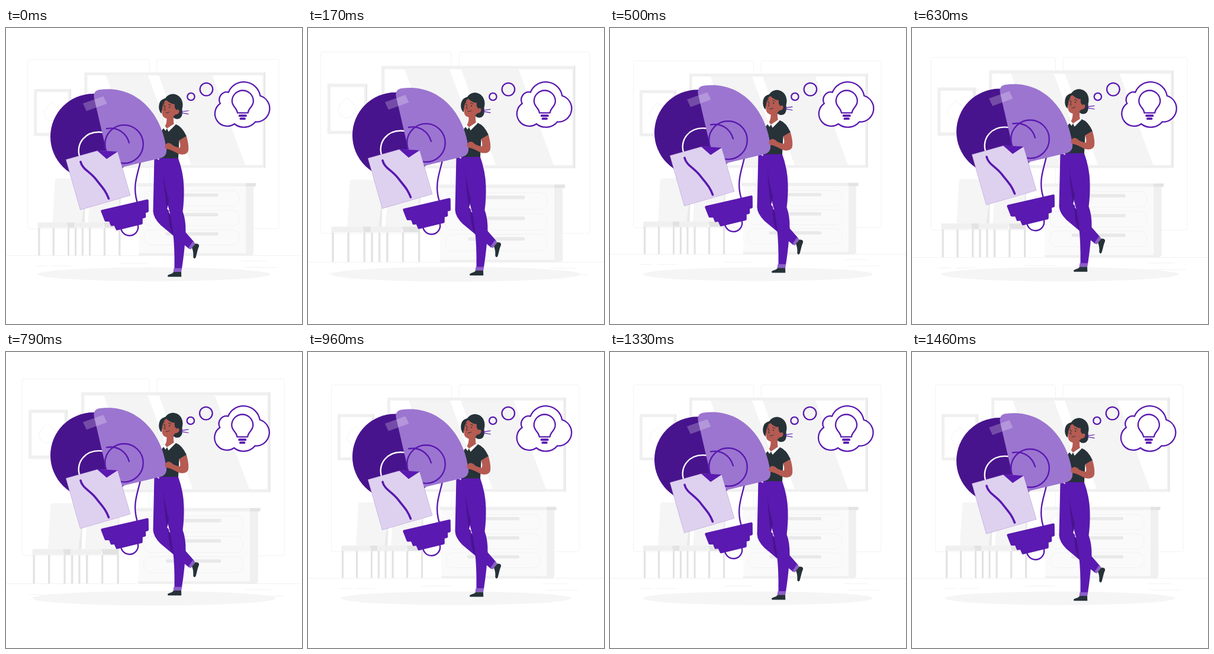
An HTML page for the animation above (1500 ms loop, 500 px wide and 500 px high).

```html
<!DOCTYPE html>
<html lang="en">
<head>
<meta charset="utf-8">
<title>Building an idea</title>
<style>
  html, body { margin: 0; height: 100%; overflow: hidden; background: #fff; }
  svg { display: block; width: 100vw; height: 100vh; }
  .line { fill: none; stroke: #5a19b0; stroke-width: 2.4; stroke-linecap: round; }
  .main { fill: #5a19b0; }
  .deep { fill: #48148d; }
  .soft { fill: #9c75d0; }
  .cuff { fill: #8c5ec8; }
  .ink { fill: #263238; }
  .skin { fill: #b55b52; }
  .face { fill: none; stroke: #263238; stroke-width: .9; stroke-linecap: round; }
  .faint { fill: none; stroke: #f0f0f0; stroke-width: .8; }
</style>
</head>
<body>
<svg viewBox="0 0 500 500">
  <g id="room">
    <g class="faint">
      <rect x="39.5" y="55.5" width="203" height="282" rx="3"/>
      <rect x="255" y="55.5" width="203" height="282" rx="3"/>
      <path d="M-50 382.3H550M52 399.500H73M80 399.500H112M192 395.500H241M396 391.500H437M402 402H456"/>
    </g>

    <!-- pictures -->
    <path fill="#e6e6e6" d="M52 105H112V183H52ZM136 77H435.500V236H136Z"/>
    <path fill="#f0f0f0" d="M50 105H110.500V183H50ZM134 77H433.500V236H134Z"/>
    <path fill="#fff" d="M55 110H107V178H55ZM139 82H431V231.500H139Z"/>
    <path class="faint" d="M80.500 126L92 138Q97 147 90 154Q80 162 71 154Q64 147 69 138Z"/>
    <path fill="#f4f4f4" d="M170 82H240L294 231.500H224ZM258 82H347L402 231.500H312Z"/>

    <!-- dresser -->
    <path fill="#fafafa" d="M225 266H404V379H225Z"/>
    <path fill="#f0f0f0" d="M222 261.500H404V267H222ZM403 267H416V379L413 382.500H226L224 378.500H403Z"/>
    <path fill="#e3e3e3" d="M403 261.500H419.500V267H403Z"/>
    <g id="drawers"></g>

    <!-- chairs -->
    <path fill="#f5f5f5" d="M89 254H134Q138 254 137 258L130 327H81L85 258Q85 254 89 254ZM149 254H192Q196 254 195 258L190 327H140L145 258Z"/>
    <path fill="#e9e9e9" d="M137 256L134.500 327H129.500L134 290ZM195 256L194 327H190L192 290Z"/>
    <path fill="#e3e3e3" d="M57 336h3.200v46h-3.200zM81 336h3.200v46h-3.200zM106 336h3v46h-3zM117.800 336h3.200v46h-3.200zM129.500 336h3v46h-3zM141.500 336h3.200v46h-3.200zM166 336h3.200v46h-3.200zM191 336h3.200v46h-3.200z"/>
    <path fill="#f0f0f0" d="M56 329Q56 327 58 327H166V336H56Z"/>
    <path fill="#e3e3e3" d="M105 327H117V336H107ZM166 327H192Q194 327 194 329V336H168Z"/>
  </g>

  <ellipse id="shadow" cx="250" cy="416" rx="194" ry="11.500" fill="#f5f5f5"/>

  <g id="figure">
    <!-- legs -->
    <path class="main" d="M250.500 219L248.500 310Q249 321 261 333L309.500 373.500L318 362L304 346L275 312L290 240Z"/>
    <path fill="#fff" d="M272 305.500L275.500 293L278 312Z"/>
    <path class="deep" d="M274.500 311L284 325V352.500Q275 343 274.500 311Z"/>
    <path class="main" d="M258 219H290.500Q300 245 300.500 270Q301 292 298.500 310Q304 325 303.500 345Q302 375 297 407H284.500Q285 370 282 345Q280 322 274 302Q266 260 258 219Z"/>
    <path class="deep" d="M266 245Q268 268 275 291L272 306Q267 275 266 245Z"/>
    <path class="cuff" d="M308.500 371L316 360.500L319.500 364L312 374.500ZM283.500 406H297.200L296.200 412.500H282.500Z"/>
    <path class="ink" d="M283.500 412.300H296L296.300 420.500H274Q271 418.500 276 416.500Q281 415.500 283.500 412.300ZM314 371.500L319.500 364.500Q327 364 326 369C323 376 322 384 320.500 388Q317.500 391.500 316.300 387Q317 378 314 371.500Z"/>

    <!-- torso and head -->
    <path class="ink" d="M250 220.300V205L264 172L270 166L287 163Q297 166 305 183L292.500 190.500L291 220.300Z"/>
    <path class="skin" d="M271 148L284 145Q282 155 284 163L273 170.500L267 168Q273 162 271 148Z"/>
    <path fill="#fff" d="M284 162L286.500 163.500L274.500 175.500L272 170ZM268 165.500L272 170L269.500 174L265 168Z"/>
    <path class="ink" d="M262.500 145Q257 139 258.500 130Q260 121 269 119C274 112 282 110 289 113.500C297 117 300.500 128 297.500 137Q299.500 149 293.500 153Q286 156 282 150L272 122Q265 130 262.500 145Z"/>
    <path class="skin" d="M268 124Q274 118 280 123Q287 127 287.500 139Q292 136 292.700 140.500Q292.500 146 286 146.500Q280 154.500 272 153.500Q264 152 263.500 144Q263 132 268 124Z"/>
    <path class="ink" d="M270 121Q278 116 288 122L288 138Q284 137 285 129Q276 128 270 121Z"/>
    <path class="face" d="M265.500 129L268 127.500M274.500 129.500Q277 129 279 131M269 133L267.500 138.500L269.500 139M270 143.500Q273 144.500 276 142"/>
    <path class="ink" d="M266.300 131.800a.9 1.200 0 1 0 1.800 0a.9 1.200 0 1 0-1.800 0M275.300 134a.9 1.200 0 1 0 1.800 0a.9 1.200 0 1 0-1.800 0"/>
    <path class="line" style="stroke-width:1.200" d="M296 141.800L308 140M296 143.500L308 145.700"/>

    <!-- bulb -->
    <circle class="deep" cx="147.500" cy="183.800" r="72.500"/>
    <path class="line" style="stroke:#fff" d="M124.500 218C117 196 134 173 163 176.500"/>
    <path class="line" d="M227 226C223 246 213 266 221.500 294M194 336A14.600 14.600 0 1 0 223 334"/>
    <path class="soft" d="M148.700 118Q147 106 158 104.500C216 96 262 139 271 204Q272.500 217 261 220L177 240Z"/>
    <path fill="#fff" fill-opacity=".24" d="M130 127.800L164.500 115.500L170.500 128L136 140.500Z"/>
    <circle class="line" cx="199.500" cy="196.500" r="32.300"/>
    <path class="line" d="M170 170.300C188 167 203 177 208 194"/>
    <path fill="#ded1ef" stroke="#9c75d0" stroke-width=".4" d="M101.200 222.500L154.500 207.500L188.500 209L210 283L125.500 307.500Z"/>
    <path class="main" d="M153.500 207L188.800 209L170 221.500Z"/>
    <path class="line" style="stroke-width:3.600" d="M126 226.300C129 239 142 243 152 256S168 274 173.500 288.500"/>
    <path class="main" stroke="#5a19b0" stroke-width="4" stroke-linejoin="round" d="M162.300 309.500L238.800 291.800L239 309.500L234 311L234.300 319L228.800 320.500V330L187.500 340L184 332L178.500 332.800L175.500 325L168.500 325.300Z"/>

    <path class="skin" d="M292.500 190L304.800 183C307.500 192 309 201 308 207C306.500 214 299 215 292 213C286 210 280 206.500 274 205C267.500 205 267 199 271 196C275 192.500 280 196 282.500 199C287 201 292 203 294 202Q295 197 292.500 190Z"/>
  </g>

  <g id="thought" class="line" style="stroke-width:2.300">
    <circle cx="312.600" cy="116" r="6.200"/>
    <circle cx="338.600" cy="103.600" r="10.800"/>
    <path fill="#fff" d="M376 108.500A28 28 0 0 1 429.500 114.500A22.500 22.500 0 0 1 421.500 158.500A25.500 25.500 0 0 1 386 162A21 21 0 0 1 362 127.500A13 13 0 0 1 376 108.500Z"/>
    <path stroke-linejoin="round" d="M391 143.300C390.500 135 382 133 382 123.500A18 18 0 0 1 418 123.500C418 133 409.500 135 409 143.300Z"/>
    <path stroke-width="3.800" d="M394.800 148.200H405.200M396.600 153.200H403.200"/>
  </g>
</svg>
<script>
const LOOP = 1500, LEAD = 20;
const el = id => document.getElementById(id);

el("drawers").innerHTML = [274.5, 307, 339].map(y => `
  <rect class="faint" x="233.5" y="${y}" width="158.500" height="25.500" rx="11"/>
  <rect x="269" y="${y + 4.3}" width="88" height="5.500" rx="2" fill="#e9e9e9"/>`).join("");

// Keyframes are [progress, value] pairs joined by straight lines.
const BEAT = [[0, 1], [.1, 1.1], [.3, 1], [.4, 1], [.5, 1.1], [.6, 1], [1, 1]];
const FLOAT = [[0, 0], [.5, -10], [1, 0]];
const SHAKE = [[0, 0], [.1, -1], [.2, 2], [.3, -4], [.4, 4], [.5, -4],
               [.6, 4], [.7, -4], [.8, 2], [.9, -1], [1, 0]];

function tween(keys, p) {
  const i = keys.findIndex(key => key[0] > p);
  const [p0, v0] = keys[i - 1], [p1, v1] = keys[i];
  return v0 + (v1 - v0) * (p - p0) / (p1 - p0);
}

const move = (id, x, y) => el(id).setAttribute("transform", `translate(${x} ${y})`);
const zoom = (id, s, x, y) => el(id).setAttribute("transform",
  `translate(${x} ${y}) scale(${s}) translate(${-x} ${-y})`);

function draw() {
  const p = (performance.now() + LEAD) % LOOP / LOOP;
  const beat = tween(BEAT, p);
  zoom("room", beat, 250, 228);
  zoom("shadow", beat, 250, 416);
  move("figure", 0, tween(FLOAT, p));
  move("thought", tween(SHAKE, p), 0);
  requestAnimationFrame(draw);
}
draw();
</script>
</body>
</html>
```
